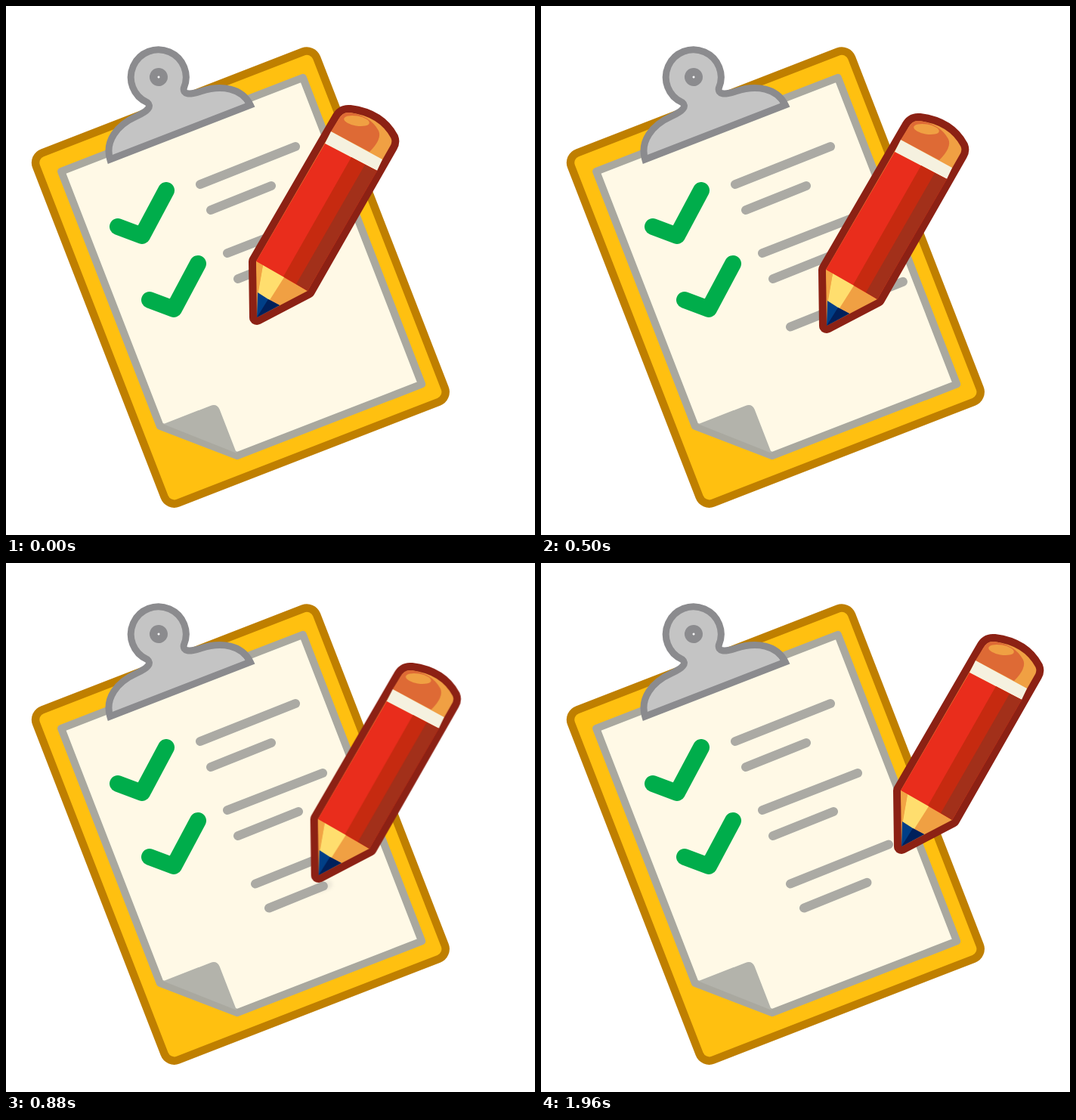
An HTML page that plays this animation: 700x700 px, repeating every 2000 ms.

```html
<!DOCTYPE html>
<html lang="en">
<head>
<meta charset="utf-8">
<title>Checklist</title>
<style>
  html, body { margin: 0; width: 100%; height: 100%; overflow: hidden; background: #fff; }
  svg { display: block; width: 100%; height: 100%; }

  .rule { stroke: #abaaa4; stroke-width: 12; stroke-linecap: round; }
  .tick { fill: none; stroke: #00ad4b; stroke-width: 22; stroke-linecap: round; stroke-linejoin: round; }

  /* 48 poses per loop; each pose is held, so every span is stepped */
  .pencil, .first, .second, .smear { animation: 2s step-end -5ms infinite; }
  .pencil { animation-name: write; }
  .first { animation-name: first; }
  .second { animation-name: second; }
  .smear { animation-name: smear; filter: blur(2.5px); }

  @keyframes write {
    0% { transform: translate(0, 0); }
    2.0833% { transform: translate(5px, -2px); animation-timing-function: steps(4); }
    10.4167% { transform: translate(57px, -23px); animation-timing-function: steps(4); }
    18.75% { transform: translate(115px, -42px); }
    20.8333% { transform: translate(103px, -33px); }
    22.9167% { transform: translate(76px, -12px); }
    25% { transform: translate(46px, 11px); }
    27.0833% { transform: translate(26px, 26px); }
    29.1667% { transform: translate(17px, 33px); }
    31.25% { transform: translate(20px, 32px); }
    33.3333% { transform: translate(25px, 30px); }
    35.4167% { transform: translate(32px, 27px); }
    37.5% { transform: translate(39.5px, 23px); }
    39.5833% { transform: translate(51px, 18px); }
    41.6667% { transform: translate(65px, 11px); animation-timing-function: steps(3); }
    47.9167% { transform: translate(115px, -19px); }
    50% { transform: translate(130px, -28px); }
    52.0833% { transform: translate(140px, -34px); }
    54.1667%, 100% { transform: translate(145px, -37px); }
  }

  @keyframes first {
    0% { stroke-dasharray: 0 400; opacity: 0; }
    2.0833% { stroke-dasharray: 6 400; opacity: 1; animation-timing-function: steps(4); }
    10.4167% { stroke-dasharray: 133 400; opacity: 1; animation-timing-function: steps(4); }
    18.75% { stroke-dasharray: 188 400; opacity: 1; animation-timing-function: steps(5); }
    29.1667% { stroke-dasharray: 142 400; opacity: 1; animation-timing-function: steps(12); }
    54.1667% { stroke-dasharray: 145 400; opacity: 1; animation-timing-function: steps(21); }
    97.9167%, 100% { stroke-dasharray: 140 400; opacity: 1; }
  }

  @keyframes second {
    0% { stroke-dasharray: 0 400; opacity: 0; }
    31.25% { stroke-dasharray: 4 400; opacity: 1; animation-timing-function: steps(3); }
    37.5% { stroke-dasharray: 40 400; opacity: 1; animation-timing-function: steps(4); }
    45.8333%, 100% { stroke-dasharray: 90 400; opacity: 1; }
  }

  @keyframes smear {
    0% { transform: translate(332px, 424px); opacity: 0; }
    2.0833% { transform: translate(335px, 423px); opacity: .9; animation-timing-function: steps(4); }
    10.4167% { transform: translate(455px, 376px); opacity: .9; animation-timing-function: steps(4); }
    18.75% { transform: translate(348px, 456px); opacity: 0; }
    31.25% { transform: translate(352px, 455px); opacity: .9; animation-timing-function: steps(3); }
    37.5% { transform: translate(388px, 439px); opacity: .9; animation-timing-function: steps(4); }
    45.8333%, 100% { transform: translate(430px, 424px); opacity: 0; }
  }
</style>
</head>
<body>
<svg viewBox="0 0 700 700">
  <g transform="rotate(-21.2)" stroke-linejoin="round">
    <rect x="-39.500" y="198.500" width="398" height="497" rx="14" fill="#ffc010" stroke="#bf7f00" stroke-width="10.500"/>
    <path d="M-11 230.500H332V665.500H70L-11 592Z" fill="#fff9e6" stroke="#a9a89f" stroke-width="10"/>
    <path d="M-6 591H61Q70 591 70.500 600V662Z" fill="#b3b3ab"/>
    <path d="M55 239C57 214 80 200 108 198.500Q134 197 128 186.500A36.500 36.500 0 1 1 180 186.500Q174 197 200 198.500C228 200 252 214 254 239Z"
          fill="#c4c4c4" stroke="#8b8b8e" stroke-width="9" stroke-linejoin="miter"/>
    <circle cx="154.300" cy="160.700" r="12" fill="#8b8b8e"/>
    <circle cx="154.300" cy="160.700" r="1.500" fill="#fff"/>
  </g>

  <g class="rule">
    <path d="M257 236L383 186M271 270L351 238M293 327L419 278M307 361L387 329"/>
    <path class="first" d="M330 424.500L516 350"/>
    <path class="second" d="M348 456.600L441 419"/>
    <path class="smear" d="M-6 2.400L6 -2.400"/>
  </g>

  <path class="tick" d="M148 292L180 304L212 244M190 389L222 401L254 341"/>

  <g class="pencil">
    <path d="M331 338L440 150Q445 140 455 141Q494 146 509.500 175Q511.500 180 508.500 185L399 377L332 412Z"
          fill="#f0a043" stroke="#8c2114" stroke-width="20" stroke-linejoin="round" paint-order="stroke"/>
    <path d="M430 166L440 150Q445 140 455 141Q482 145 493 165Q498 176 481 193Z" fill="#de6a35"/>
    <ellipse cx="464" cy="152" rx="17" ry="6.500" transform="rotate(10 464 152)" fill="#f0a043"/>
    <path d="M430 166L498 203L491 218L422 182Z" fill="#f5f1df"/>
    <path d="M422 182L491 218L399 377L331 338Z" fill="#e92d1c"/>
    <path d="M457 200L491 218L399 377L367 358Z" fill="#c62a10"/>
    <path d="M475 210L491 218L399 377L384 368Z" fill="#a2301a"/>
    <path d="M340 343L368 359L347 392L333 384Z" fill="#ffde6e"/>
    <path d="M331 338L340 343L333 381Z" fill="#f2a444"/>
    <path d="M333 379L347 388L362 396L332 412Z" fill="#003f87"/>
    <path d="M347 388L362 396L332 412Z" fill="#00205b"/>
  </g>
</svg>
</body>
</html>
```
